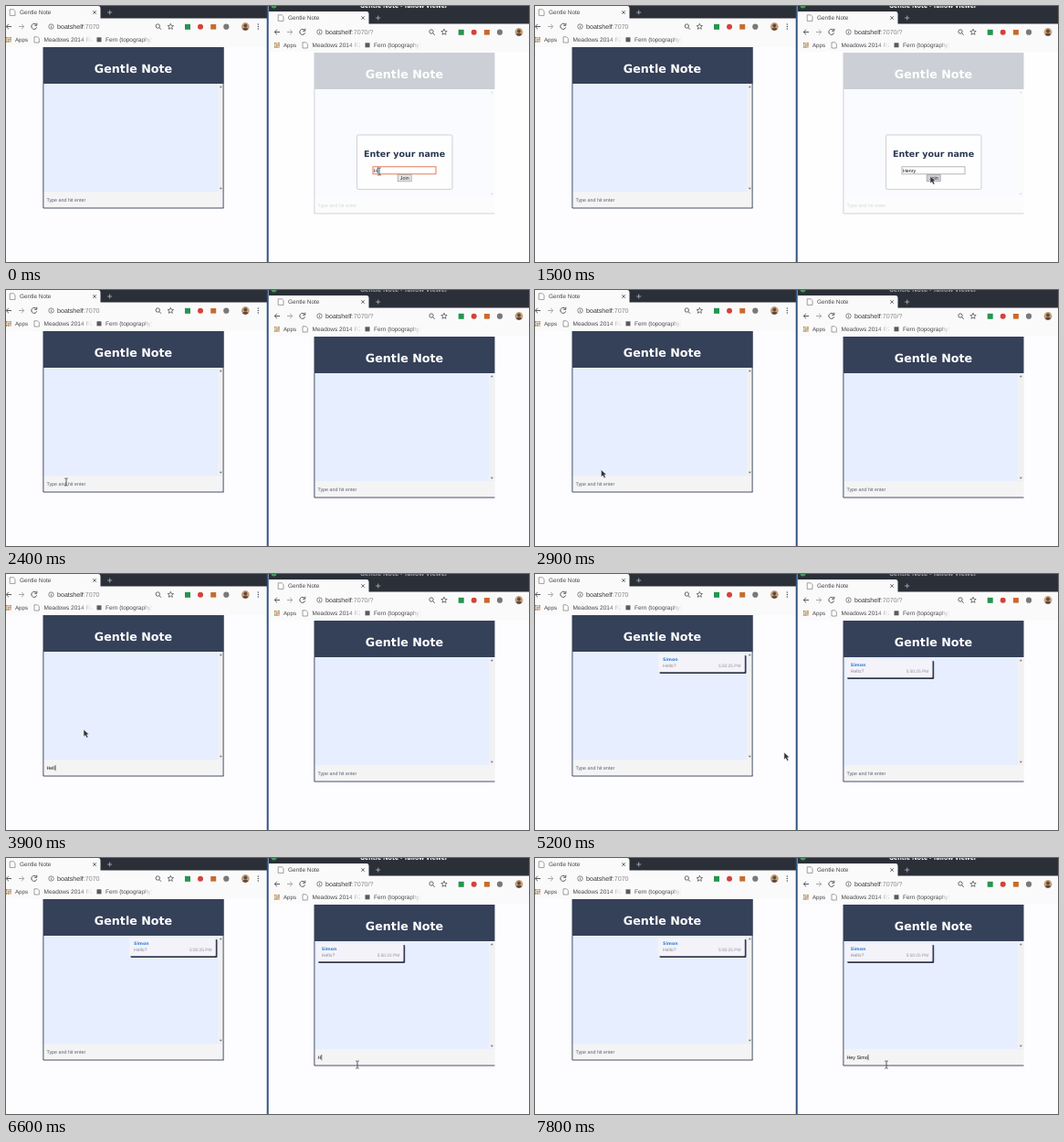
These frames come from a looping animation (573 px wide and 280 px high, 8 s). An HTML page:

```html
<!DOCTYPE html>
<html lang="en">
<head>
<meta charset="utf-8">
<title>Chat demo</title>
<style>
  html, body { margin: 0; width: 100%; height: 100%; overflow: hidden; background: #fdfcfe; }
  svg { display: block; width: 573px; height: 280px; text-rendering: geometricPrecision; }
  text { font-family: "Liberation Sans", Arial, sans-serif; white-space: pre; }
  .bold { font-family: "DejaVu Sans", Verdana, sans-serif; font-weight: bold; }
</style>
</head>
<body>
<svg id="stage" viewBox="0 0 573 280"></svg>
<script>
const LOOP = 8000;
const APP = "Gentle Note";
const NAVY = "#354059", CHROME = "#fbfafb", PAGE = "#fdfcfe", STRIP = "#2b3038", ICON = "#55585e";

const rect = (x, y, w, h, fill, more = "") =>
  `<rect x="${x}" y="${y}" width="${w}" height="${h}" fill="${fill}" ${more}/>`;
const dot = (x, y, r, fill, more = "") =>
  `<circle cx="${x}" cy="${y}" r="${r}" fill="${fill}" ${more}/>`;
const line = (d, color = ICON, w = 1) =>
  `<path d="${d}" fill="none" stroke="${color}" stroke-width="${w}"/>`;
const text = (x, y, size, fill, str, more = "") =>
  `<text x="${x}" y="${y}" font-size="${size}" fill="${fill}" ${more}>${str}</text>`;
const group = (x, y, inner, more = "") =>
  `<g transform="translate(${x} ${y})" ${more}>${inner}</g>`;

function star(x, y) {
  const pts = Array.from({ length: 10 }, (_, i) => {
    const a = i * Math.PI / 5 - Math.PI / 2, r = i % 2 ? 1.5 : 3.4;
    return `${(x + r * Math.cos(a)).toFixed(2)},${(y + r * Math.sin(a)).toFixed(2)}`;
  });
  return `<polygon points="${pts.join(" ")}" fill="none" stroke="${ICON}" stroke-width=".8"/>`;
}

function appsGrid(x, y) {
  const colors = ["#d9534a", "#e0a03a", "#4a9a5c"];
  let out = "";
  for (let i = 0; i < 9; i++)
    out += rect(x + (i % 3) * 2.1, y + Math.floor(i / 3) * 2.1, 1.5, 1.5, colors[(i + Math.floor(i / 3)) % 3]);
  return out;
}

function bookmark(x, str) {
  return text(x, 39, 6.5, "#45464a", str) + rect(x + 39, 32, 13, 10, "url(#fade)") +
    rect(x + 52, 32, 16, 10, CHROME);
}

// Tab, address bar and bookmarks; toolShift moves the icons on the right.
function browser(url, toolShift) {
  const t = x => x + toolShift;
  return `<path d="M-7 14V0H101Q103.5 0 103.5 3V14Z" fill="${CHROME}"/>` +
    `<path d="M4.2 3.8H8.2L10 5.6V10.4H4.2Z" fill="#fff" stroke="#777" stroke-width=".7"/>` +
    text(15, 9.2, 6.45, "#46474a", APP) +
    line("M95.3 5.2l3.6 3.6m0-3.6l-3.6 3.6", "#55585e", .9) +
    line("M111.2 7h5m-2.5-2.5v5", "#a8adb5", .9) +
    line("M6 22.5H0.3m2.6-2.7l-2.7 2.7l2.7 2.7") +
    line("M14 22.5H19.7m-2.6-2.7l2.7 2.7l-2.7 2.7", "#a5a7ab") +
    line("M33.1 20.4A3 3 0 1 0 33.7 23.3M33.8 18.7V21.3H31.2") +
    dot(49.5, 22.5, 2.7, "none", `stroke="${ICON}" stroke-width=".7"`) +
    line("M49.5 22v2m0-3.2v.7", ICON, .7) +
    text(56, 25, 7.1, "#36373b", "boatshelf" + `<tspan fill="#85878c">:7070${url}</tspan>`) +
    dot(t(166.3), 22, 2.2, "none", `stroke="${ICON}" stroke-width=".9"`) +
    line(`M${t(168)} 23.7l2 2`) + star(t(180.3), 22.6) +
    rect(t(196), 19.8, 6, 6, "#259450") +
    dot(t(213), 22.7, 3, "#d3423a") +
    rect(t(224.2), 20, 6, 5.6, "#c86a2d") +
    dot(t(241.3), 22.7, 3.1, "#77797d") +
    dot(t(262.3), 22.5, 4.4, "#c4a078") +
    dot(t(262.3), 21.4, 1.9, "#60483c") +
    `<path d="M${t(259)} 25.3q3.3 -3.4 6.6 0q-3.3 3 -6.6 0Z" fill="#60483c"/>` +
    [20, 22.5, 25].map(y => dot(t(276.3), y, .8, ICON)).join("") +
    appsGrid(0, 34) + text(10, 39, 6.15, "#45464a", "Apps") +
    `<path d="M31 33.8H34.6L36.3 35.5V40H31Z" fill="#fff" stroke="#777" stroke-width=".7"/>` +
    bookmark(41.5, "Meadows 2014 R2") +
    rect(99.5, 34.3, 5, 5, "#5a5b5e") + bookmark(109, "Fern (topography)");
}

// Chat panel, 198 x 176.
function panel(id, bubbleX) {
  return rect(0, 0, 198, 40, NAVY) +
    text(99, 27.7, 12.67, "#fff", APP, `class="bold" text-anchor="middle"`) +
    rect(0, 40, 198, 118.5, "#e6eeff") +
    rect(191.5, 40, 6.5, 118.5, "#f1f1f2") +
    `<path d="M193.2 44.2l1.6 -1.9l1.6 1.9ZM193.2 153.8l1.6 1.9l1.6 -1.9Z" fill="#77797f"/>` +
    rect(0, 158.5, 198, 17.5, "#f4f4f5") +
    line("M.4 40V176H198", NAVY, .9) +
    `<g id="${id}Bubble">` + group(bubbleX, 42.2,
      rect(1.7, 1.7, 95, 20, "#343a52", `rx="1.2"`) +
      rect(0, 0, 95, 20, "#f4f3fa", `rx="1"`) +
      text(5.3, 7.7, 4.7, "#2f80d8", "Simon", `class="bold"`) +
      text(5.3, 14.7, 5.1, "#8b8b92", "Hello?") +
      text(90.7, 14.7, 4.8, "#96969c", "5:50:25 PM", `text-anchor="end"`)) + `</g>` +
    text(4, 169, 5.33, "#5c6172", "", `id="${id}Field"`) +
    `<path id="${id}Caret" fill="none" stroke="#111" stroke-width=".6"/>`;
}

const modal = rect(288, 50, 285, 230, "#fff", `opacity=".75"`) +
  rect(384.5, 141, 104.5, 59.5, "#fefefe", `rx="1.5" stroke="#cfd1d6" stroke-width="1"`) +
  text(436.6, 165, 9.5, "#2c3954", "Enter your name", `class="bold" text-anchor="middle"`) +
  rect(402, 175.8, 69, 8, "#fff", `id="nameBox" stroke-width="1"`) +
  text(403, 181.7, 5.33, "#111", "", `id="nameField"`) +
  `<path id="nameCaret" fill="none" stroke="#111" stroke-width=".6"/>` +
  rect(429.2, 184.6, 15, 7.2, "#e6e6e8", `id="join" stroke="#a4a4a8" stroke-width=".8"`) +
  text(436.7, 190, 5.4, "#222", "Join", `text-anchor="middle"`);

const stage = document.getElementById("stage");
stage.innerHTML =
  `<defs><linearGradient id="fade"><stop stop-color="${CHROME}" stop-opacity="0"/>` +
  `<stop offset="1" stop-color="${CHROME}"/></linearGradient></defs>` +
  rect(0, 0, 573, 280, PAGE) +
  rect(0, 0, 286, 14, STRIP) + rect(0, 13.5, 286, 31.5, CHROME) +
  group(0, 0, browser("", 0)) +
  group(40.5, 45, panel("left", 94.3) + line("M197.6 0V176", NAVY, .9)) +
  rect(288, 0, 285, 20, STRIP) + rect(288, 19.5, 285, 31, CHROME) +
  group(294, 6, browser("/?", 5.7)) +
  rect(288, 0, 285, 6, STRIP) + dot(293.5, -.5, 3, "#3f9b56") +
  text(436, 1.8, 7, "#fff", APP + " - Tallow Viewer", `id="title" class="bold" text-anchor="middle" style="font-family:'Open Sans',sans-serif"`) +
  group(337.5, 51, panel("right", 3)) +
  `<g id="modal">${modal}</g>` +
  rect(285.7, 0, 2, 280, "#31547f") +
  `<path id="arrow" d="M0 0V8L1.9 6.4L3.4 9.3L5 8.5L3.6 5.7L6 5.4Z" fill="#33363c" stroke="#fff" stroke-width=".5"/>` +
  `<path id="beam" d="M-1.8 -4H-.5L0 -3.5L.5 -4H1.8M0 -3.5V3.5M-1.8 4H-.5L0 3.5L.5 4H1.8" fill="none" stroke="#34363a" stroke-width=".8"/>`;

const $ = id => document.getElementById(id);
const show = (id, on) => $(id).setAttribute("display", on ? "inline" : "none");

// Pointer stops: time, x, y.
const path = [
  [0, 409, 181], [1000, 409, 181], [1300, 428, 184], [1450, 433, 186], [1600, 433, 186],
  [1900, 23, 214], [2050, 28, 213], [2300, 66, 210], [2800, 66, 210], [3100, 85, 170],
  [5000, 85, 170], [5200, 272.5, 195], [5500, 384, 227], [5900, 385, 226], [8000, 385, 226]
];
const keys = {
  name: ["Henry", [0, 400, 600, 700, 800]],
  left: ["Hello?", [3500, 3600, 3800, 3900, 4100, 4300]],
  right: ["Hey Simon", [6600, 6700, 6800, 7300, 7500, 7600, 7700, 7800]]
};
const SENT = 4600, JOINED = 1600;

function pointer(t) {
  const i = Math.max(1, path.findIndex(p => t <= p[0]));
  const [t0, x0, y0] = path[i - 1], [t1, x1, y1] = path[i];
  const k = (t - t0) / (t1 - t0);
  return [x0 + (x1 - x0) * k, y0 + (y1 - y0) * k];
}

function typed(id, t) {
  const [word, times] = keys[id];
  return word.slice(0, times.filter(at => at <= t).length);
}

function setField(id, str, hint, x, y, focus) {
  const field = $(id + "Field"), value = str || hint;
  if (field.textContent !== value) field.textContent = value;
  if (hint) field.setAttribute("fill", str ? "#111" : "#5c6172");
  const end = x + (str ? field.getComputedTextLength() : 0) + .4;
  $(id + "Caret").setAttribute("d", `M${end} ${y - 5}v6.2`);
  show(id + "Caret", focus && str);
}

function draw(t) {
  const hint = "Type and hit enter";
  setField("name", typed("name", t), "", 403, 181.7, t < 1450);
  setField("left", t < SENT ? typed("left", t) : "", hint, 4, 169, true);
  setField("right", typed("right", t), hint, 4, 169, true);
  $("nameBox").setAttribute("stroke", t < 1450 ? "#e37a58" : "#b4b4b8");
  $("join").setAttribute("fill", t < 1450 ? "#e6e6e8" : "#cfcfd2");
  show("modal", t < JOINED);
  show("leftBubble", t >= SENT);
  show("rightBubble", t >= SENT);
  $("title").setAttribute("fill", t >= 2400 && t < 6200 ? "#9a9da3" : "#fff");

  const [x, y] = pointer(t);
  const beam = t < 100 || (t >= 2200 && t < 2900) || t >= 5450;
  show("beam", beam);
  show("arrow", !beam && t >= 1100);
  for (const id of ["beam", "arrow"])
    $(id).setAttribute("transform", `translate(${x.toFixed(2)} ${y.toFixed(2)})`);
}

function tick() {
  draw(performance.now() % LOOP);
  requestAnimationFrame(tick);
}
tick();
</script>
</body>
</html>
```
